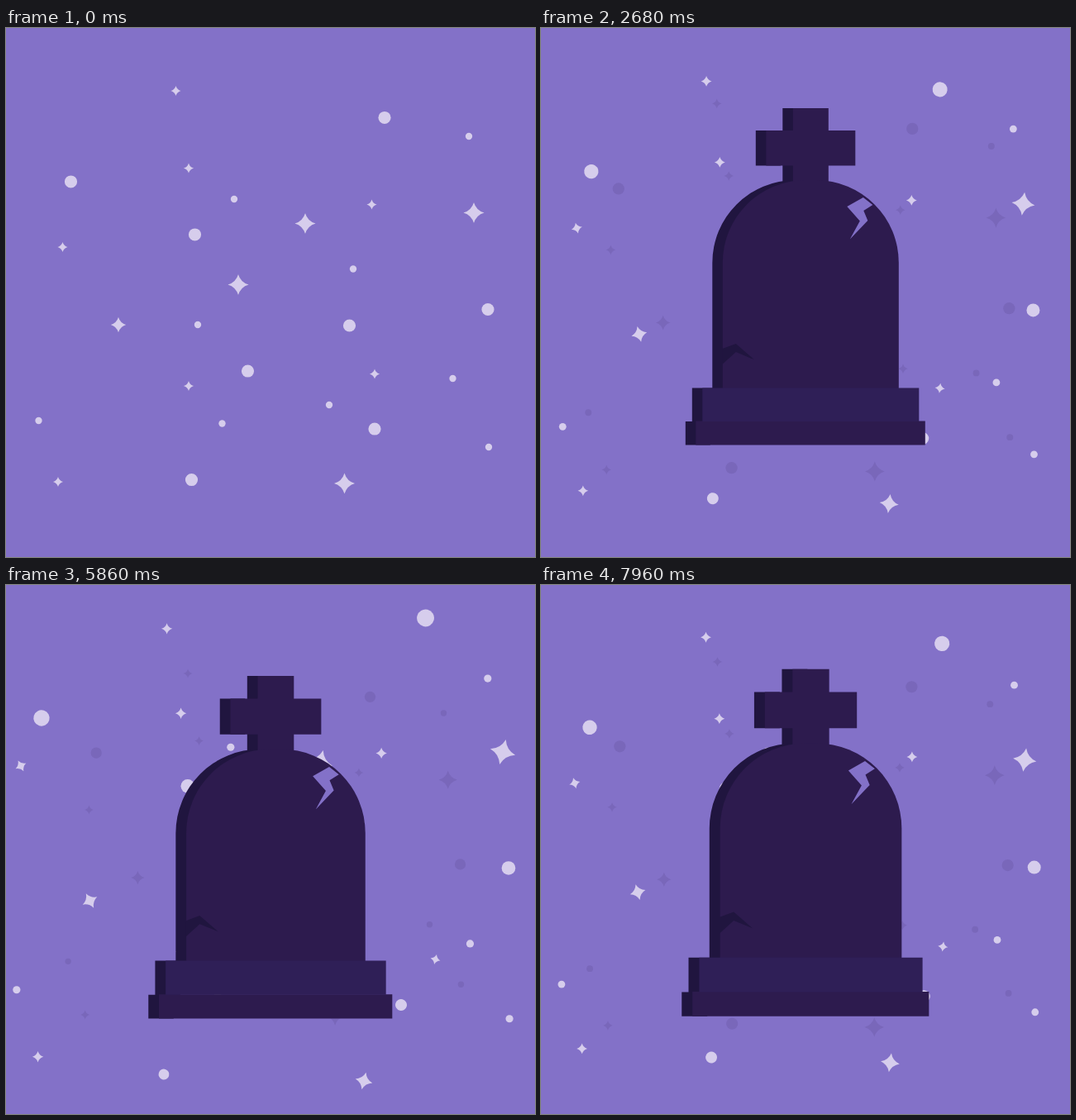
Recreate the animation shown at these times as an HTML page. Size 640 by 640 pixels, loop 8 s.

```html
<!DOCTYPE html>
<html lang="en">
<head>
<meta charset="utf-8">
<title>Tombstone among stars</title>
<style>
  html, body { margin: 0; width: 100%; height: 100%; overflow: hidden; background: #8371c8; }
  svg { display: block; width: 100vw; height: 100vh; }
</style>
</head>
<body>
<svg viewBox="0 0 640 640">
  <rect width="640" height="640" fill="#8371c8"/>
  <g id="shadows" fill="#7967ba"></g>
  <g id="lights" fill="#d6cdec"></g>
  <g id="tomb">
    <g fill="#20153f">
      <path d="M292.5 97h30v95h-30zM260 124h30v42.5h-30z"/>
      <path d="M207.5 437V284a100 100 0 0 1 100-100h30v253z"/>
      <path d="M183 435.5h30v41h-30zM175 476h30v28.3h-30z"/>
    </g>
    <g fill="#2d1b4e">
      <path d="M305 97h43v95h-43zM272.5 124h108v42.5h-108z"/>
      <path d="M220 437V284a100 100 0 0 1 100-100h13a100 100 0 0 1 100 100v153z"/>
      <path d="M187.5 475.5H465v28.8H187.500z"/>
    </g>
    <path fill="#2f1f57" d="M195.5 435.5h262V476h-262z"/>
    <path fill="#8371c8" d="M370.5 216L390 205L401.5 214L390.5 221L395.5 233L374 255.5L386 233.500z"/>
    <path fill="#20153f" d="M219.5 388L236 382L258 401L236 392L219.5 407z"/>
  </g>
</svg>
<script>
const LOOP = 8000;
const CENTER = 320;
const TURNAROUND = 5640;
const NS = 'http://www.w3.org/2000/svg';

const $ = id => document.getElementById(id);
const mix = (a, b, k) => a + (b - a) * k;
const clamp = k => Math.min(1, Math.max(0, k));
const from = (scale, v) => mix(CENTER, v, scale);

function ramp(t, start, end) {
  const k = clamp((t - start) / (end - start));
  return k * k * (3 - 2 * k);
}

function add(parent, attrs) {
  const node = document.createElementNS(NS, 'path');
  for (const name in attrs) node.setAttribute(name, attrs[name]);
  return parent.appendChild(node);
}

const dot = r => `M${-r} 0a${r} ${r} 0 0 1 ${2 * r} 0a${r} ${r} 0 0 1 ${-2 * r} 0z`;

function sparkle(r) {
  const c = r * 0.23;
  return `M0 ${-r}Q${c} ${-c} ${r} 0Q${c} ${c} 0 ${r}Q${-c} ${c} ${-r} 0Q${-c} ${-c} 0 ${-r}z`;
}

const stars = [];

// Each point is x, y; a second pair is where a drifting star ends up.
function scatter(d, ...points) {
  for (const [x, y, endX, endY] of points) {
    const drifts = endX !== undefined;
    stars.push({
      x, y,
      endX: drifts ? endX : from(1.095, x),
      endY: drifts ? endY : from(1.095, y),
      grow: drifts ? 1.5 - 0.0012 * y : 1.095,
      turn: drifts ? (x < CENTER ? -28 : 14) : 0,
      shadow: add($('shadows'), { d }),
      light: add($('lights'), { d })
    });
  }
}

scatter(dot(7.6), [458, 108.5, 507.5, 40], [78.5, 186, 43, 161], [446, 485, 478, 508],
  [224.5, 546.5, 191, 592], [228.5, 250], [583, 340.5], [415.5, 360], [292.5, 415]);
scatter(dot(4.2), [560, 131], [276, 207], [420, 291.5], [232, 359], [540.5, 424],
  [391, 456], [39.5, 475], [261.5, 478.5], [584, 507]);
scatter(sparkle(6.1), [68.5, 265, 18, 219], [446, 418.5, 519.5, 453], [205.5, 76],
  [221, 169.5], [442.5, 213.5], [221, 433], [63, 549]);
scatter(sparkle(9.3), [136, 359, 101.5, 382]);
scatter(sparkle(12.6), [566, 223.5, 601, 202], [409.5, 551, 433, 600],
  [362, 236.5, 380, 215], [281, 310.5]);

function place(node, x, y, scale, turn = 0) {
  node.setAttribute('transform', `translate(${x} ${y}) rotate(${turn}) scale(${scale})`);
}

function drawStars(t) {
  const spread = t < TURNAROUND
    ? 1.048 * t / TURNAROUND
    : 1.048 - 0.000215 * (t - TURNAROUND);
  const inward = 1 - 0.127 * spread;
  for (const s of stars) {
    place(s.shadow, from(inward, s.x), from(inward, s.y), inward);
    place(s.light, mix(s.x, s.endX, spread), mix(s.y, s.endY, spread),
      mix(1, s.grow, spread), s.turn * spread);
  }
}

function drawTomb(t) {
  const slide = 50 * clamp(1 - t / 2700) ** 2;
  const drop = 20.3 * ramp(t, 2600, 4400) - 6 * ramp(t, 5200, 7000);
  const pulse = 1 + 0.091 * Math.sin(Math.PI * clamp((t - 5400) / 3200)) ** 2;
  $('tomb').setAttribute('transform',
    `translate(${CENTER + slide} ${404 + slide / 9 + drop}) scale(${pulse}) translate(-320.2 -404)`);
  $('tomb').setAttribute('opacity', ramp(t, 150, 900));
}

const start = performance.now();
function tick() {
  const t = (performance.now() - start) % LOOP;
  drawStars(t);
  drawTomb(t);
  requestAnimationFrame(tick);
}
tick();
</script>
</body>
</html>
```
